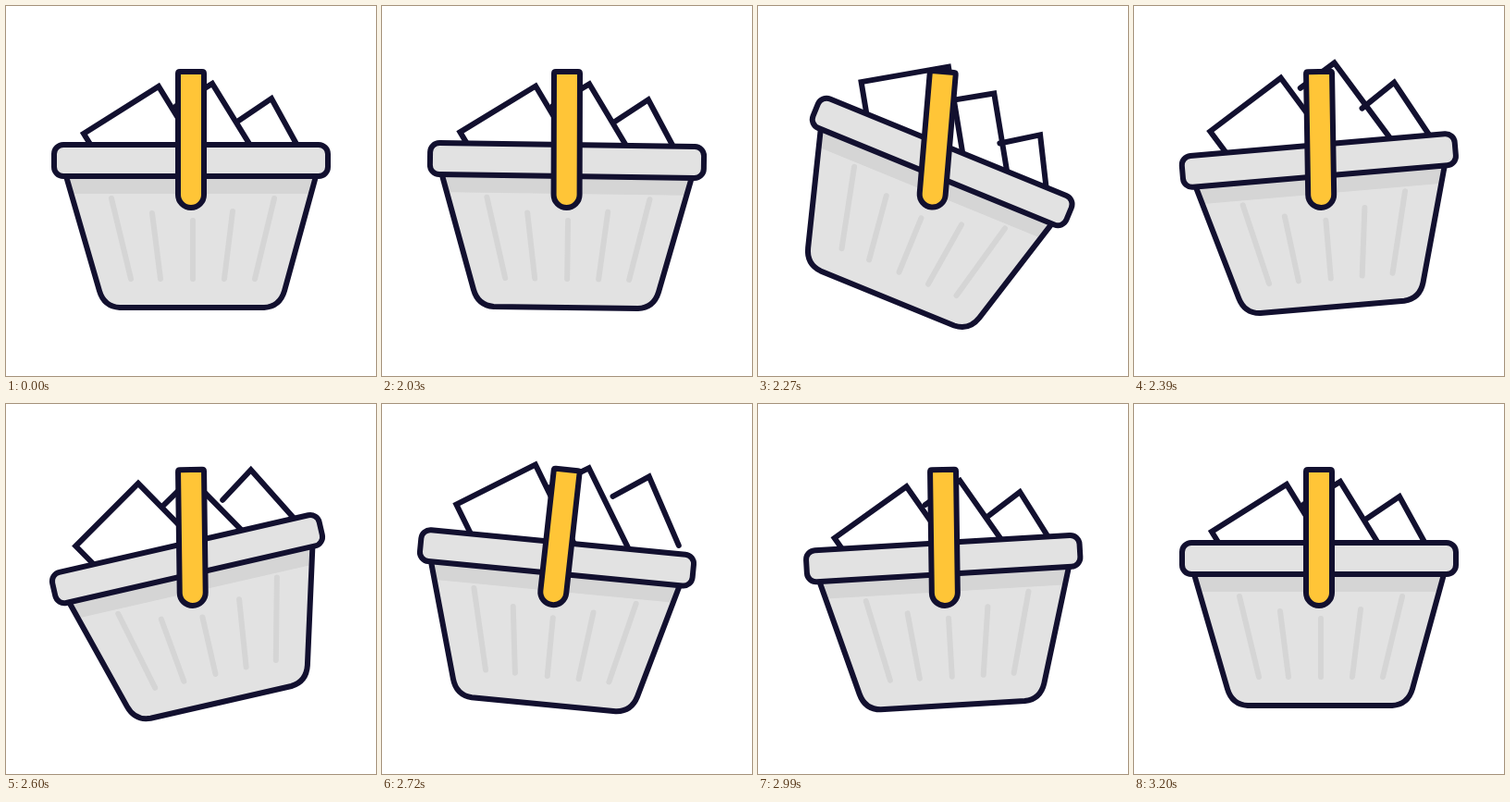
An HTML page for the animation above (3.29 s loop, 400 by 400 pixels).

```html
<!DOCTYPE html>
<html lang="en">
<head>
<meta charset="utf-8">
<title>Swinging basket</title>
<style>
  html, body { margin: 0; width: 100%; height: 100%; overflow: hidden; background: #fff; }
  svg { display: block; width: 100%; height: 100%; }
  .line { stroke: #12102f; stroke-width: 6; }
  .paper { stroke-linecap: round; }
  .ribs { stroke: #d5d5d5; stroke-width: 6; stroke-linecap: round; }
</style>
</head>
<body>
<svg viewBox="0 0 400 400" fill="none">
  <g id="swing">
    <g id="basket">
      <path id="middle" class="line paper" d="M184 108 L223 84 L276 170"/>
      <path id="left" class="line" fill="#fff" d="M105 172 L84 138 L165 87 L216 170Z"/>
      <path id="right" class="line paper" d="M250 125 L287 100 L326 171"/>
      <path fill="#e2e2e2" d="M65 184 L101 308 Q106 325 123 326 H279 Q296 325 301 308 L335 184Z"/>
      <path fill="#d5d5d5" d="M66 184 H334 L328 203 H72Z"/>
      <path class="ribs" d="M114 208 L135 295 M158 224 L167 295 M202 232 V295 M245 222 L236 295 M290 208 L269 295"/>
      <path class="line" d="M65 184 L101 308 Q106 325 123 326 H279 Q296 325 301 308 L335 184"/>
      <rect class="line" x="52" y="150" width="296" height="34" rx="10" fill="#e2e2e2"/>
    </g>
    <path class="line" fill="#ffc537" d="M186 73 Q186 71 188 71 H212 Q214 71 214 73 V204 A14 14 0 0 1 186 204Z"/>
  </g>
</svg>
<script>
  const LOOP = 3290, START = 2030, STEP = 30;
  const $ = id => document.getElementById(id);
  const swing = $('swing'), basket = $('basket');

  // Handle and basket turn back at the same moments; angles in degrees
  const turns = [2000, 2250, 2500, 2740, 2980, 3200];
  const swingAngles = [0, 5, -5, 6.5, -0.8, 0];
  const tiltAngles = [0, 23, -24, 6, -3.4, 0];

  // A quick hop and a slow hop for each paper
  const papers = [
    { el: $('left'), quick: [2322, 27], slow: [2690, 19] },
    { el: $('middle'), quick: [2355, 25], slow: [2780, 21] },
    { el: $('right'), quick: [2430, 13], slow: [2720, 30] }
  ];

  const ease = p => (1 - Math.cos(Math.PI * p)) / 2;

  function angleAt(angles, t) {
    const i = turns.findIndex(end => t < end);
    if (i < 1) return 0;
    const p = (t - turns[i - 1]) / (turns[i] - turns[i - 1]);
    return angles[i - 1] + (angles[i] - angles[i - 1]) * ease(p);
  }

  function hop([peak, height], width, t) {
    const p = 1 - 2 * Math.abs(t - peak) / width;
    return p > 0 ? height * ease(p) : 0;
  }

  function draw(ms) {
    const now = ms % LOOP;
    const t = now < START ? 0 : START + Math.floor((now - START) / STEP) * STEP;
    const lean = angleAt(swingAngles, t);
    const tilt = angleAt(tiltAngles, t);
    swing.setAttribute('transform', `rotate(${lean} 200 70)`);
    // the basket hangs on the handle, so its own lean is taken off
    basket.setAttribute('transform', `rotate(${tilt - lean} 200 192)`);
    for (const { el, quick, slow } of papers) {
      const y = hop(quick, 260, t) + hop(slow, 420, t);
      el.setAttribute('transform', `translate(${0.13 * y} ${-y})`);
    }
  }

  const begin = performance.now();
  function tick() {
    draw(performance.now() - begin);
    requestAnimationFrame(tick);
  }
  tick();
</script>
</body>
</html>
```
